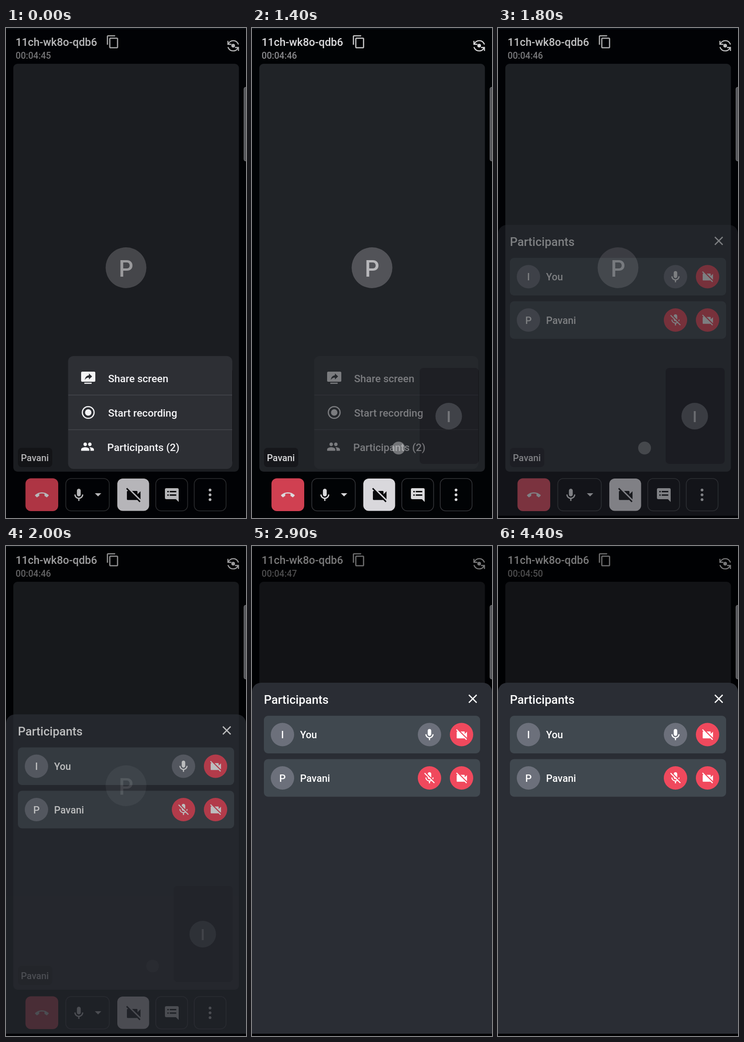
An HTML page that plays this animation: 524x1068 px, repeating every 4500 ms.

```html
<!DOCTYPE html>
<html lang="en">
<head>
<meta charset="utf-8">
<title>Call participants</title>
<style>
html, body { margin: 0; width: 100%; height: 100%; overflow: hidden; background: #000; }
svg { display: block; width: 100%; height: 100%; }
text { font-family: Roboto, "Open Sans", sans-serif; font-weight: 500; }
</style>
</head>
<body>
<svg id="stage" viewBox="0 0 524 1068"></svg>
<script>
const LOOP = 4500, STEP = 100, GUEST = "Pavani";
const RED = "#f0495d", LIGHT = "#f4f4f6";

const icons = {
  hangup: [12, 11.5, "M12 9c-1.6 0-3.15.25-4.6.72v3.1c0 .39-.23.74-.56.9-.98.49-1.87 1.12-2.66 1.85-.18.18-.43.28-.7.28-.28 0-.53-.11-.71-.29L.29 13.08c-.18-.17-.29-.42-.29-.7s.11-.53.29-.71C3.34 8.78 7.46 7 12 7s8.66 1.78 11.71 4.67c.18.18.29.43.29.71s-.11.53-.29.71l-2.48 2.48c-.18.18-.43.29-.71.29-.27 0-.52-.11-.7-.28-.79-.74-1.69-1.36-2.67-1.85-.33-.16-.56-.5-.56-.9v-3.1C15.15 9.25 13.6 9 12 9z"],
  mic: [12, 11.5, "M12 14c1.66 0 3-1.34 3-3V5c0-1.66-1.34-3-3-3S9 3.34 9 5v6c0 1.66 1.34 3 3 3zm5-3c0 2.76-2.24 5-5 5s-5-2.24-5-5H5c0 3.53 2.61 6.43 6 6.92V21h2v-3.08c3.39-.49 6-3.39 6-6.92h-2z"],
  micOff: [12, 11.8, "M19 11h-1.7c0 .74-.16 1.43-.43 2.05l1.23 1.23c.56-.98.9-2.09.9-3.28zm-4.02.17c0-.06.02-.11.02-.17V5c0-1.66-1.34-3-3-3S9 3.34 9 5v.18l5.98 5.99zM4.27 3L3 4.27l6.01 6.01V11c0 1.66 1.33 3 2.99 3 .22 0 .44-.03.65-.08l1.66 1.66c-.71.33-1.5.52-2.31.52-2.76 0-5.3-2.1-5.3-5.1H5c0 3.41 2.72 6.23 6 6.72V21h2v-3.28c.91-.13 1.77-.45 2.54-.9L19.73 21 21 19.73 4.27 3z"],
  camOff: [11.5, 11.5, "M21 6.5l-4 4V7c0-.55-.45-1-1-1H9.82L21 17.18V6.5zM3.27 2L2 3.27 4.73 6H4c-.55 0-1 .45-1 1v10c0 .55.45 1 1 1h12c.21 0 .39-.08.54-.18L19.73 21 21 19.73 3.27 2z"],
  chat: [12, 12, "M4 2h16a2 2 0 0 1 2 2v18l-4-4H4a2 2 0 0 1-2-2V4a2 2 0 0 1 2-2zM5.5 6v2h2V6zM9 6v2h9.5V6zM5.5 11v2h2v-2zM9 11v2h9.5v-2z"],
  copy: [11.5, 12, "M16 1H4c-1.1 0-2 .9-2 2v14h2V3h12V1zm3 4H8c-1.1 0-2 .9-2 2v14c0 1.1.9 2 2 2h11c1.1 0 2-.9 2-2V7c0-1.1-.9-2-2-2zm0 16H8V7h11v14z"],
  people: [12, 12, "M16 11c1.66 0 2.99-1.34 2.99-3S17.66 5 16 5s-3 1.34-3 3 1.34 3 3 3zm-8 0c1.66 0 2.99-1.34 2.99-3S9.66 5 8 5 5 6.34 5 8s1.34 3 3 3zm0 2c-2.33 0-7 1.17-7 3.5V19h14v-2.5c0-2.33-4.67-3.5-7-3.5zm8 0c-.29 0-.62.02-.97.05 1.16.84 1.97 1.97 1.97 3.45V19h6v-2.5c0-2.33-4.67-3.5-7-3.5z"]
};

const rect = (x, y, w, h, r, fill, more = "") =>
  `<rect x="${x}" y="${y}" width="${w}" height="${h}" rx="${r}" fill="${fill}" ${more}/>`;
const circle = (x, y, r, fill, more = "") =>
  `<circle cx="${x}" cy="${y}" r="${r}" fill="${fill}" ${more}/>`;
const path = (d, fill, more = "") => `<path d="${d}" fill="${fill}" ${more}/>`;
const line = (d, color, w) => path(d, "none", `stroke="${color}" stroke-width="${w}"`);
const text = (x, y, size, fill, str, more = "") =>
  `<text x="${x}" y="${y}" font-size="${size}" fill="${fill}" ${more}>${str}</text>`;
const middle = 'text-anchor="middle"';
const icon = (name, x, y, k, fill) => {
  const [cx, cy, d] = icons[name];
  return path(d, fill, `fill-rule="evenodd" transform="translate(${x} ${y}) scale(${k}) translate(${-cx} ${-cy})"`);
};
const outline = (x, w) => rect(x, 982, w, 70.5, 12, "none", 'stroke="#3b3c40" stroke-width="1.6"');

const header =
  text(21, 39, 23.6, LIGHT, "11ch-wk8o-qdb6") +
  text(21, 66.5, 19.6, "#99999c", "", 'id="clock"') +
  icon("copy", 232.5, 30, 1.3, "#dededf") +
  circle(496, 38.5, 4, LIGHT) +
  line("M484.5 28v7.5h7.5M485.5 35C489 26 503 24 507.5 36M507.5 50v-7.5h-7.5M506.5 43C503 52 489 53 484.5 41.5", LIGHT, 2.3);

const video =
  rect(16, 78, 492.5, 889, 9, "#24272c") +
  circle(262, 522.5, 44.5, "#5c5d62") +
  text(262, 542, 49.5, "#cdcdd0", "P", middle) +
  rect(26, 915, 75, 42, 8, "#191a1e") +
  text(63, 944, 20.3, LIGHT, GUEST, middle) +
  rect(366, 741, 129, 209, 8, "#15151b") +
  circle(429.5, 846, 29, "#585c62") +
  text(429.5, 858.5, 34, "#c4c5c8", "I", middle);

const controls =
  rect(42.5, 981.5, 71.5, 71.5, 12, "#e8475b") +
  icon("hangup", 78.3, 1017.5, 1.25, LIGHT) +
  outline(130.5, 95) +
  icon("mic", 159, 1017.5, 1.4, LIGHT) +
  path("M194 1014h14l-7 7z", LIGHT) +
  rect(243, 982, 69.5, 70.5, 12, "#f3f1f6") +
  icon("camOff", 278, 1018, 1.65, "#0a0b0e") +
  outline(327, 69.5) +
  icon("chat", 362, 1018, 1.5, LIGHT) +
  outline(411, 69.5) +
  [1007, 1017.5, 1028].map(y => circle(445.5, y, 3, LIGHT)).join("");

const menu =
  rect(135.5, 715, 358.5, 246, 12, "#2d2f34") +
  line("M136 800H494M136 875.5H494", "#45474d", 1.3) +
  rect(164, 749, 31, 22, 2.5, LIGHT) +
  rect(171, 773, 16, 2.5, 0, LIGHT) +
  path("M172 767c1-6.500 4.500-9.500 9-10v-4l7 6.500-7 6.500v-4c-4 0-6.500 1.500-9 5z", "#2d2f34") +
  circle(179.5, 838, 12.8, "none", `stroke="${LIGHT}" stroke-width="2.6"`) +
  circle(179.5, 838, 7, LIGHT) +
  icon("people", 178, 912.5, 1.27, LIGHT) +
  text(223, 771.5, 22.5, LIGHT, "Share screen") +
  text(223, 847, 22.5, LIGHT, "Start recording") +
  text(221, 922, 22.7, LIGHT, "Participants (2)");

const person = (y, letter, name, micIcon, micFill) =>
  rect(26, y, 472, 82, 9, "#40484f") +
  circle(66.5, y + 41, 25.5, "#6c707b") +
  text(66.5, y + 49, 22, "#fff", letter, middle) +
  text(105, y + 49.3, 21.7, "#fff", name) +
  circle(387.5, y + 41, 25.5, micFill) +
  icon(micIcon, 387.5, y + 41, 1.28, "#fff") +
  circle(457.5, y + 41, 25.5, RED) +
  icon("camOff", 457.5, y + 41, 1.25, "#fff");

// Drawn with its top edge at y = 0
const sheet =
  path("M0 1000V20A20 20 0 0 1 20 0H504A20 20 0 0 1 524 20V1000z", "#2a2d34") +
  text(26, 45.7, 26, "#fff", "Participants") +
  line("M473.500 26.500l17 17m0-17l-17 17", "#fff", 2.5) +
  person(72, "I", "You", "mic", "#6c707b") +
  person(166.5, "P", GUEST, "micOff", RED);

document.getElementById("stage").innerHTML =
  '<clipPath id="screen"><rect width="524" height="1063"/></clipPath>' +
  rect(0, 0, 524, 1068, 0, "#010306") + rect(0, 0, 524, 2.5, 0, "#0c1219") +
  header + video + controls +
  rect(0, 0, 524, 1068, 0, "#000", 'id="scrim"') +
  `<g id="menu">${menu}</g>` +
  `<g clip-path="url(#screen)"><g id="sheet">${sheet}</g></g>` +
  circle(320, 915.5, 14, "#fff", 'id="touch"') +
  rect(519.5, 129, 12, 161, 4, "#55565a", 'stroke="#77787b" stroke-width="1"');

const el = id => document.getElementById(id);
const [clock, scrim, menuEl, sheetEl, touch] = ["clock", "scrim", "menu", "sheet", "touch"].map(el);

// Linear interpolation through [time, value] points
function track(t, points) {
  if (t <= points[0][0]) return points[0][1];
  for (let i = 1; i < points.length; i++) {
    const [t0, a] = points[i - 1], [t1, b] = points[i];
    if (t <= t1) return a + (b - a) * (t - t0) / (t1 - t0);
  }
  return points[points.length - 1][1];
}

function draw(t) {
  const menuIn = track(t, [[1000, 1], [1700, 0]]);
  const sheetIn = track(t, [[1500, 0], [2200, 1]]);
  const top = track(t, [[1500, 522], [1800, 429], [2000, 367], [2200, 298]]);
  const ticks = [1000, 2400, 3200, 3700, 4200].filter(s => t >= s).length;

  clock.textContent = "00:04:" + (45 + ticks);
  scrim.setAttribute("opacity", 0.25 * menuIn + 0.5 * sheetIn);
  menuEl.setAttribute("opacity", menuIn);
  sheetEl.setAttribute("opacity", sheetIn);
  sheetEl.setAttribute("transform", `translate(0 ${top})`);
  touch.setAttribute("opacity", track(t, [[800, 0], [1000, 0.4], [1400, 0.36], [1800, 0.16], [2000, 0.02], [2100, 0]]));
}

const start = performance.now();
function tick() {
  const t = (performance.now() - start) % LOOP;
  draw(Math.floor(t / STEP) * STEP);
  requestAnimationFrame(tick);
}
tick();
</script>
</body>
</html>
```
